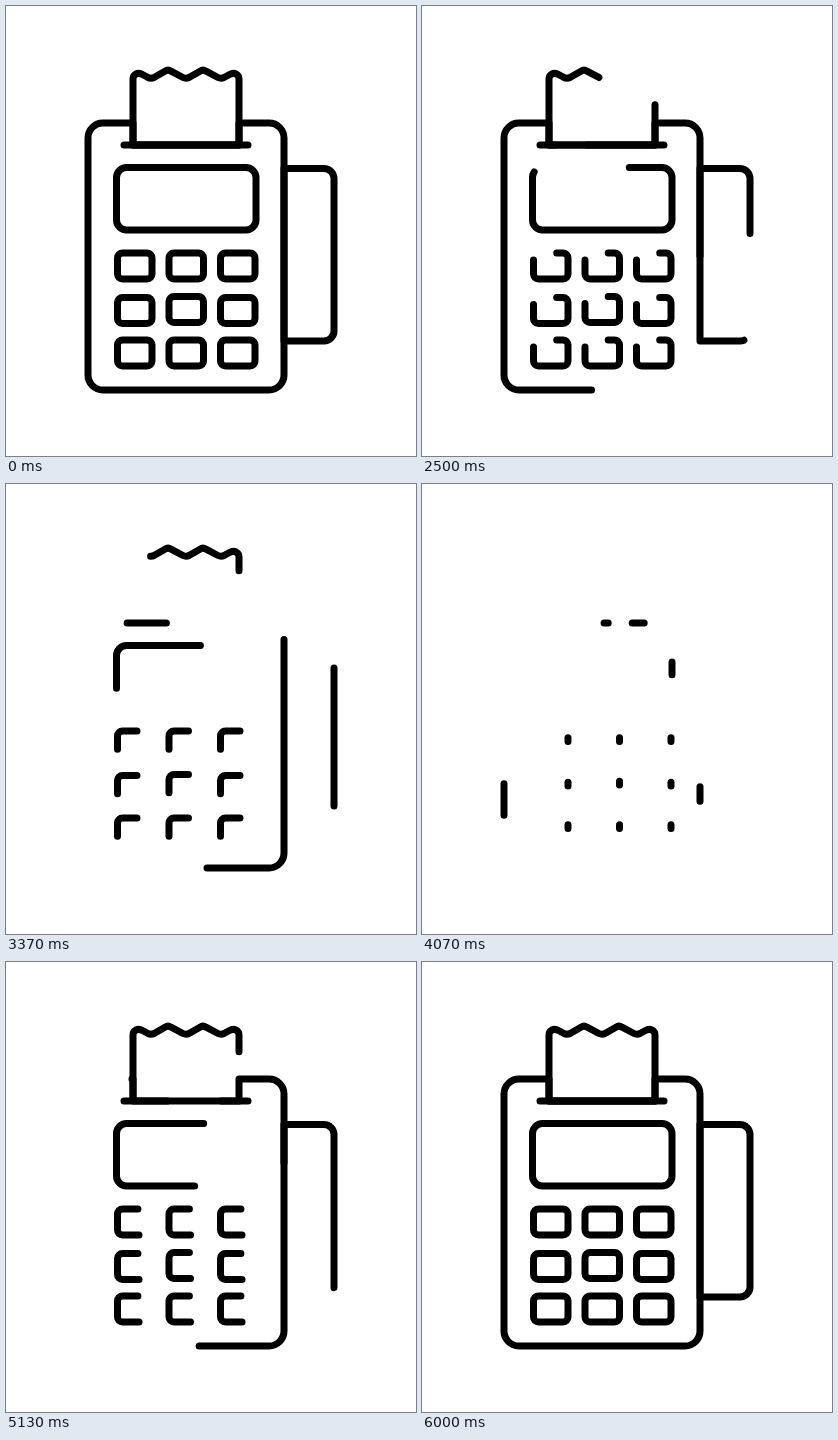
Recreate the animation shown at these times as an HTML page. Size 410 by 450 pixels, loop 6030 ms.

```html
<!DOCTYPE html>
<html lang="en">
<head>
<meta charset="utf-8">
<title>Card terminal</title>
<style>
  html, body { margin: 0; width: 100%; height: 100%; overflow: hidden; background: #fff; }
  svg { display: block; width: 410px; height: 450px; }
  path { fill: none; stroke: #000; stroke-width: 7; stroke-linecap: round; stroke-linejoin: round; }
</style>
</head>
<body>
<svg viewBox="0 0 410 450"></svg>
<script>
const LOOP = 6030, FPS = 30, HOLD = 60, DRAW = 120;
const svg = document.querySelector('svg');

// Clockwise rounded rectangle, starting above its bottom-left corner.
const box = (x, y, w, h, r) =>
  `M${x} ${y + h - r}v${2 * r - h}a${r} ${r} 0 0 1 ${r} ${-r}h${w - 2 * r}` +
  `a${r} ${r} 0 0 1 ${r} ${r}v${h - 2 * r}a${r} ${r} 0 0 1 ${-r} ${r}h${2 * r - w}` +
  `a${r} ${r} 0 0 1 ${-r} ${-r}z`;

const body = 'M278 132V369a15 15 0 0 1-15 15H97a15 15 0 0 1-15-15V132a15 15 0 0 1 15-15H127V139H233V117H263a15 15 0 0 1 15 15z';
const tab = 'M328 173V325a10 10 0 0 1-10 10H278V162.5H318a10 10 0 0 1 10 10z';
const slot = 'M118 139H242';
const paper = 'M136.5 68.5L142 71.5Q145 73 148 71.5L159 65.2Q162 63 165 65.2L177 71.5Q180 73 183 71.5' +
  'L194 65.2Q197 63 200 65.2L212 71.5Q215 73 218 71.5L223.5 68.5C228 66 233 68 233 73V139H127V73C127 68 132 66 136.5 68.5z';

const shapes = [body, tab, slot, paper, box(110.5, 161.5, 139.5, 62.5, 10)];
[247, 291.5, 334].forEach((y, row) =>
  [111.5, 163, 214.5].forEach((x, col) =>
    shapes.push(box(x, row === 1 && col === 1 ? y - 1 : y, 34.5, 26, 5))));

const paths = shapes.map(d => {
  const path = document.createElementNS('http://www.w3.org/2000/svg', 'path');
  path.setAttribute('d', d);
  path.setAttribute('pathLength', 1);
  return svg.appendChild(path);
});

function render(time) {
  const step = Math.floor((time % LOOP + 4) * FPS / 1000);
  const u = Math.min(1, Math.max(0, (step - HOLD) / DRAW));
  const length = Math.abs(1 - 2 * u);
  const start = (u < 0.5 ? 3 * u : u) % 1;
  svg.style.visibility = length ? 'visible' : 'hidden';
  for (const { style } of paths) {
    style.strokeDasharray = length === 1 ? 'none' : `${length} ${1 - length}`;
    style.strokeDashoffset = -start;
  }
}

const begin = performance.now();
function tick() {
  render(performance.now() - begin);
  requestAnimationFrame(tick);
}
tick();
</script>
</body>
</html>
```
